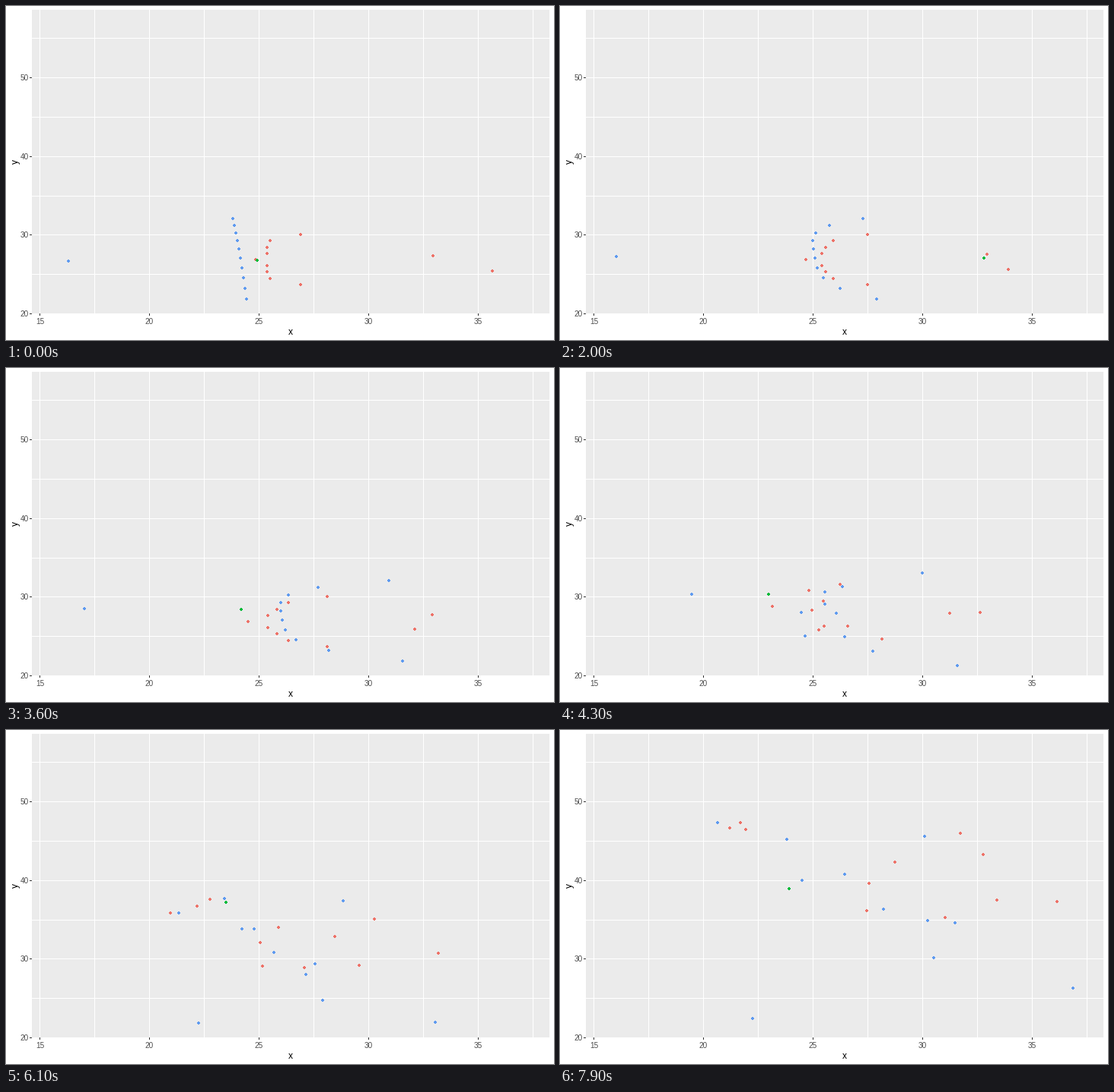
A matplotlib script for the animation above (8 s loop, 720 by 440 pixels).

```python
import numpy as np
import matplotlib.pyplot as plt
from matplotlib.animation import FuncAnimation
from matplotlib.patches import Rectangle
from matplotlib.path import Path

W, H, DPI = 720, 440, 100
FRAMES, STEP = 80, 100
PX = 72 / DPI  # points per pixel
SNAP, TURN, END = 1100, 3600, 7900  # ms
DRIFT = np.array([-48, 27])  # shared pull to the loose ball

# Where everyone ends up, from the top of each line to the bottom
BLUE_END = [(479, 140), (318, 198), (374, 190), (425, 236), (519, 254),
            (253, 380), (207, 122), (483, 251), (491, 300), (674, 340)]
RED_END = [(237, 122), (244, 131), (440, 174), (406, 202), (223, 129),
           (506, 247), (403, 238), (556, 164), (574, 224)]

# Key points as (ms, x, y)
BALL = [(SNAP, 330, 335), (1400, 467, 333), (1600, 557, 331),
        (2400, 557, 332), (2700, 409, 339), (TURN, 309, 318),
        (5000, 240, 278), (6100, 289, 227), (END, 301, 209)]
RETURNER = [(1400, 82, 336), (2700, 65, 324), (TURN, 103, 317),
            (5000, 243, 280), (6100, 287, 222), (END, 298, 144)]


def blue_line():
    """Shallow arc; the edge players rush hardest."""
    v = np.linspace(-1, 1, 10)
    start = np.c_[307 + 9 * v, 333 + 53 * v - 7 * np.cos(np.pi * v / 2)]
    return start, start + np.c_[55 + 150 * v**4, 0 * v]


def red_line():
    """Evenly spaced wall with the centre forward and the wings back."""
    v = np.linspace(-1, 1, 9)
    start = np.c_[328 + 15 * (v != 0) + 44 * v**8, 334 + 33 * v]
    return start, start + np.c_[45 * abs(v) - 10, 0 * v]


def run(t, start, rush, end):
    """Rush from the line, then chase upfield along a bent path."""
    u = np.clip((t - SNAP) / (TURN - SNAP), 0, 1)
    s = np.clip((t - TURN) / (END - TURN), 0, 1)
    first = start + (rush - start) * (1 - (1 - u)**1.5)
    return first + (end - rush) * s + DRIFT * np.sin(np.pi * s)


def follow(t, keys):
    k, x, y = np.transpose(keys)
    return np.array([[np.interp(t, k, x), np.interp(t, k, y)]])


plt.rcParams["font.family"] = "Liberation Sans"
fig = plt.figure(figsize=(W / DPI, H / DPI), dpi=DPI, facecolor="white")
ax = fig.add_axes([0, 0, 1, 1])
ax.set(xlim=(0, W), ylim=(H, 0))
ax.axis("off")


def box(x, y, w, h, color):
    ax.add_patch(Rectangle((x, y), w, h, fc=color, lw=0, antialiased=False))


def label(x, y, s, size, color, **kw):
    ax.text(x, y, s, fontsize=size * PX, color=color, va="baseline", **kw)


# Panel, grid, ticks and labels
box(34, 5, 680, 400, "#EBEBEB")
for x in range(44, 714, 72):
    box(x, 5, 1, 400, "white")
for n in range(1, 8):
    box(34, int(405.4 - 51.8 * n), 680, 1, "white")
for n in range(5):
    x = 44 + 144 * n
    box(x, 405, 1, 3, "#333333")
    label(x + 0.5, 419, str(15 + 5 * n), 10, "#4D4D4D", ha="center")
for n in range(4):
    y = int(405.4 - 103.6 * n)
    box(31, y, 3, 1, "#333333")
    label(30, y + 4, str(20 + 10 * n), 10, "#4D4D4D", ha="right")
label(374, 433, "x", 12, "black", ha="center")
label(16, 205, "y", 12, "black", ha="center", rotation=90,
      rotation_mode="anchor")

# Four-pixel dot with its corners cut
DOT = Path([(-1, -2), (1, -2), (1, -1), (2, -1), (2, 1), (1, 1), (1, 2),
            (-1, 2), (-1, 1), (-2, 1), (-2, -1), (-1, -1), (-1, -2)],
           closed=True)


def dots(color):
    return ax.plot([], [], ls="none", marker=DOT, ms=4 * PX, mew=0,
                   color=color)[0]


blue, red, green = dots("#5E9AF0"), dots("#EE7167"), dots("#00BA38")

blue_start, blue_rush = blue_line()
red_start, red_rush = red_line()
holder = np.array([(561, 329), (560, 325), (653, 226)])
kicker = np.array([(639, 349), (537, 344), (526, 136)])


def draw(i):
    t = i * STEP
    defence = [run(t, blue_start, blue_rush, BLUE_END), follow(t, RETURNER)]
    offence = [run(t, red_start, red_rush, RED_END),
               run(t, *holder), run(t, *kicker)]
    for marks, parts in ((blue, defence), (red, offence),
                         (green, [follow(t, BALL)])):
        marks.set_data(*np.rint(np.vstack(parts)).T)
    return blue, red, green


anim = FuncAnimation(fig, draw, frames=FRAMES, interval=STEP, repeat=True,
                     repeat_delay=0)
plt.show()
```
